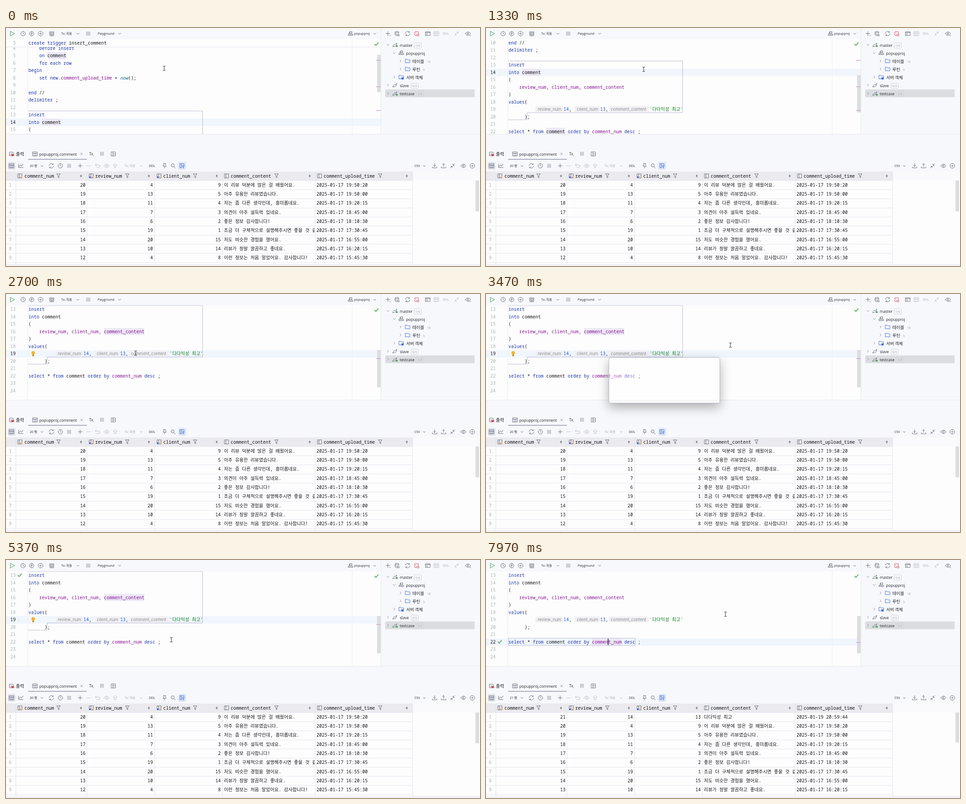
These frames come from a looping animation (1055x531 px, 8000 ms). An HTML page:

```html
<!DOCTYPE html>
<html lang="ko">
<head>
<meta charset="utf-8">
<title>SQL console</title>
<style>
html, body { margin: 0; width: 100%; height: 100%; overflow: hidden; background: #f7f8fb; }
#stage { position: relative; width: 1055px; height: 531px; overflow: hidden; }
svg { position: absolute; left: 0; top: 0; overflow: hidden; }
text { font: 8.6px "Open Sans", "Noto Sans CJK KR", "Noto Sans CJK", sans-serif; fill: #24262c; white-space: pre; }
.mono { font: 500 10px "Noto Sans Mono", "Noto Sans CJK KR", "Noto Sans CJK", monospace; fill: #17181c; }
.ko { font-family: "Noto Sans CJK KR", "Noto Sans CJK", sans-serif; font-size: 10.25px; font-weight: 400; }
.small { font-size: 7px; }
.tag { font: 9.3px Inter, sans-serif; fill: #8b8d94; }
.num { font-weight: 400; fill: #acafb8; text-anchor: end; }
.end { text-anchor: end; }
.dim { fill: #a6a8b0; }
.key { fill: #1a32a8; }
.col { fill: #871094; }
.fn { fill: #00627a; font-style: italic; }
.int { fill: #1750eb; }
.str { fill: #067d17; }
.icon { fill: none; stroke-linecap: round; stroke-linejoin: round; }
.popup {
  position: absolute; left: 273px; box-sizing: border-box;
  border: 1px solid #b3b3c0; border-radius: 5px;
  background: rgba(255, 255, 255, .35);
  box-shadow: 0 9px 24px rgba(0, 0, 0, .3);
}
.scroll { animation: scroll 8s ease-out infinite; }
.thumb { animation: thumb 8s ease-out infinite; }
#cursor { animation: move 8s ease-in-out infinite; }
@keyframes scroll {
  0%, 8.125% { transform: translateY(0); }
  10.625%, 11.875% { transform: translateY(-49.5px); }
  14.375%, 16.25% { transform: translateY(-99px); }
  16.625% { transform: translateY(-111px); }
  18.75%, 19.5% { transform: translateY(-148.5px); }
  21.25%, 100% { transform: translateY(-159.5px); }
}
@keyframes thumb {
  0%, 8.125% { transform: translateY(0); }
  10.625%, 11.875% { transform: translateY(20px); }
  14.375%, 16.25% { transform: translateY(40px); }
  16.625% { transform: translateY(45px); }
  18.75%, 19.5% { transform: translateY(60.5px); }
  21.25%, 100% { transform: translateY(65px); }
}
@keyframes move {
  0% { transform: translate(352px, 90px); }
  16.625%, 20% { transform: translate(351px, 92px); }
  24.125% { transform: translate(317px, 118px); }
  28.75%, 32.5% { transform: translate(273px, 133px); }
  40%, 62.5% { transform: translate(544px, 114px); }
  67.125% { transform: translate(368px, 178px); }
  72.5%, 76.9% { transform: translate(272px, 183px); }
  83.75%, 100% { transform: translate(533px, 121px); }
}
</style>
</head>
<body>
<div id="stage"></div>
<script>
const LOOP = 8000, PITCH = 16.5, ROW = 20.3;
// Moments in ms: clicks on lines 19 and 22, finished insert, rerun, new rows
const CLICK1 = 2400, DONE = 4600, CLICK2 = 6000, RERUN = 7500, LOADED = 7900;
const INK = '#6c707e', PALE = '#bfc1ca', BLUE = '#4a78d8', GREEN = '#3a9e4b', RED = '#db4b50';

// Animation that shows something only from a to b
const spans = new Map();
function span(a, b) {
  const name = `on${a}to${b}`;
  spans.set(name, `@keyframes ${name}{0%{opacity:0}${a * 100 / LOOP}%{opacity:1}${b * 100 / LOOP}%{opacity:0}100%{opacity:0}}`);
  return `animation:${name} ${LOOP}ms step-end infinite`;
}
const during = (a, b, body) => `<g style="${span(a, b)}">${body}</g>`;

const ko = s => s.replace(/[가-힣]+/g, m => `<tspan class="ko">${m}</tspan>`);
const text = (x, y, s, cls = '') => `<text x="${x}" y="${y}" class="${cls}">${s}</text>`;
const mono = (x, mid, s, cls = '') => text(x, mid + 3.5, ko(String(s)), 'mono ' + cls);
const rect = (x, y, w, h, fill, rx = 0) => `<rect x="${x}" y="${y}" width="${w}" height="${h}" fill="${fill}" rx="${rx}"/>`;
const path = (d, color, width = 1) => `<path d="${d}" class="icon" stroke="${color}" stroke-width="${width}"/>`;
const ring = r => `M${-r} 0a${r} ${r} 0 1 0 ${2 * r} 0a${r} ${r} 0 1 0 ${-2 * r} 0`;

const shapes = {
  run: 'M-4-5L5 0L-4 5Z',
  clock: ring(5) + 'M0-3V0L2 1.5',
  letter: ring(5) + 'M-1 3V-2.5H.5a1.5 1.5 0 0 1 0 3H-1',
  gear: 'M-2-5H2L5-2V2L2 5H-2L-5 2V-2Z' + ring(1.7),
  box: 'M-4.5-4H4.5V3H-4.5ZM-2.5-2H2.5V1H-2.5ZM-4 5H4',
  down: 'M-2.5-1L0 1.5L2.5-1',
  right: 'M-1-2.5L1.5 0L-1 2.5',
  schema: 'M-1.5-4.5H3V-1H-1.5ZM-5 1H-1.5V4H-5ZM1 1H5V4H1ZM-3 1V-3H-1.5',
  plus: 'M-4.5 0H4.5M0-4.5V4.5',
  minus: 'M-4.5 0H4.5',
  db: 'M-4-3.5a4 1.7 0 0 1 8 0a4 1.7 0 0 1-8 0V3a4 1.7 0 0 0 4 1.7M4-3.5V0M-4 0a4 1.7 0 0 0 5 1.5M2 2H5V5H2Z',
  refresh: 'M-5-.5A5 5 0 0 1 4-3M5 .5A5 5 0 0 1-4 3M4-5V-2.6H1.6M-4 5V2.6H-1.6',
  halt: 'M4-1V-4H-4V4H-1M1 1H5V5H1Z',
  console: 'M-5-4H5V4H-5ZM-5-2H5M-3 0L-1 1.2L-3 2.4',
  table: 'M-5-4.5H5V4.5H-5ZM-5-1.5H5M-1.7-1.5V4.5M1.7-1.5V4.5',
  arrows: 'M5-5L1-1M1-4V-1H4M-5 5L-1 1M-4 1H-1V4',
  eye: 'M-6 0Q0-8 6 0Q0 8-6 0Z' + ring(1.8),
  link: 'M-5 4Q-4-1 0-1L4-4L2 2Q-1 4-5 4Z',
  folder: 'M-5-4H-1L0-2.5H5V4H-5Z',
  close: 'M-2.2-2.2L2.2 2.2M2.2-2.2L-2.2 2.2',
  layout: 'M-4.5-4.5H4.5V4.5H-4.5ZM-1-4.5V4.5M-1 0H4.5',
  chart: 'M-5-4V4H5M-4 2L-1-2L1.5 1L5-4',
  undo: 'M-3-4.5L-5.2-2L-3 .5M-5-2H2a3 3 0 0 1 0 6H-2',
  up: 'M0-5L4-1H1.7V4H-1.7V-1H-4Z',
  pin: 'M-2.5-5H2.5M-2-5V-1L-3.5 1H3.5L2-1V-5M0 1V5',
  search: 'M-4.5-1a3.5 3.5 0 1 0 7 0a3.5 3.5 0 1 0-7 0M1.5 2L5 5',
  panel: 'M-5-4.5H4V-1M-5-4.5V4H-1M-2-4.5V4M0 0H5L3 2.5V5L2 4V2.5Z',
  save: 'M0-5V1.5M-2.5-1L0 1.5L2.5-1M-5 2V4.5H5V2',
  load: 'M0 1.5V-5M-2.5-2.5L0-5L2.5-2.5M-5 2V4.5H5V2',
  funnel: 'M-4-4.5H4L1-.5V4L-1 3V-.5Z',
  field: 'M-4.5-4.5H4.5V4.5H-4.5ZM-1.5-4.5V4.5',
  sort: 'M-1.4-.8L0-2.5L1.4-.8ZM-1.4 1.2L0 2.9L1.4 1.2Z',
  tick: 'M-4 0L-1.2 3L4-3.2',
};
const icon = (name, x, y, color = INK, width = 1) =>
  `<g transform="translate(${x} ${y})">${path(shapes[name], color, width)}</g>`;
const icons = (y, list) => list.map(([name, x, color]) => icon(name, x, y, color)).join('');
const tick = (x, y) => icon('tick', x, y, GREEN, 1.6);

function topBar() {
  return icons(12.5, [
    ['run', 14, GREEN], ['clock', 38], ['letter', 57], ['gear', 77], ['box', 102], ['down', 160],
    ['down', 253], ['schema', 767], ['down', 821], ['plus', 850], ['db', 870], ['refresh', 894],
    ['halt', 914, RED], ['console', 939], ['table', 958, PALE], ['arrows', 1003, PALE], ['eye', 1028],
  ]) + rect(178, 8, 10, 9, '#cfd0d5', 1)
    + text(123, 15, 'Tx: 자동', 'small') + text(204, 15, 'Playground', 'small')
    + text(775, 15, 'popupproj', 'small') + text(972, 15, 'DDL', 'small dim')
    + path('M854 17h2M1032 17h2', INK);
}

function tree() {
  const node = (y, x, arrow, name, label, color = INK) =>
    icon(arrow, x, y - 1, '#888b96') + icon(name, x + 16, y - 1, color)
    + text(x + 26.5, y + 3.3, label.replace(/[가-힣]+/g, m => `<tspan font-size="9.5">${m}</tspan>`));
  const count = (x, y, s) => text(x, y + 3.2, s, 'small dim');
  const badge = (x, y, s) => count(x, y, s)
    + `<rect x="${x - 2.5}" y="${y - 5.5}" width="16" height="12" rx="2" fill="none" stroke="#d3d4da"/>`;
  const dot = y => `<circle cx="870" cy="${y + 2}" r="2" fill="${GREEN}"/>`;
  return rect(844, 137, 199, 17.5, '#dcdde0', 2)
    + node(38.5, 850, 'down', 'link', 'master') + badge(911, 38.5, '1/4') + dot(38.5)
    + node(56.5, 864, 'down', 'schema', 'popupproj')
    + node(74.5, 878, 'right', 'folder', '테이블', BLUE) + count(937, 74.5, '18')
    + node(92.5, 878, 'right', 'folder', '루틴', BLUE) + count(928, 92.5, '9')
    + node(110.5, 864, 'right', 'folder', '서버 객체', BLUE) + rect(880, 110, 5, 5, BLUE, 1)
    + node(128.5, 850, 'right', 'link', 'slave') + badge(904, 128.5, '0/3')
    + node(147, 850, 'right', 'link', 'testcase') + badge(916, 147, '1/7') + dot(147);
}

const lineY = n => 210 + (n - 14) * PITCH;
const paint = s => s
  .replace(/\b(create|trigger|before|insert|on|for|each|row|begin|set|new|end|delimiter|into|values|select|from|order|by|desc)\b/g, '<tspan class="key">$1</tspan>')
  .replace(/\b(comment_upload_time|review_num|client_num|comment_num|comment_content)\b/g, '<tspan class="col">$1</tspan>')
  .replace('now', '<tspan class="fn">now</tspan>');
const codeLine = (s, mid) => s && text(50 + 6 * s.search(/\S/), mid + 3.5, paint(s.trim()), 'mono');

const FIRST = 3;
const code = [
  'create trigger insert_comment', '    before insert', '    on comment', '    for each row', 'begin',
  '    set new.comment_upload_time = now();', '', 'end //', 'delimiter ;', '', 'insert', 'into comment', '(',
  '    review_num, client_num, comment_content', ')', 'values(', '', '      );', '',
  'select * from comment order by comment_num desc ;', '', '',
];

function editor() {
  const current = (a, b, n) => during(a, b, rect(0, lineY(n) - 8, 834, 16.5, '#f1f6fd') + mono(21.5, lineY(n), n, 'end'));
  const mark = (x, n, chars) => rect(x, lineY(n) - 8, chars * 6, 16, '#ece8f5');
  const tag = (x, w, s) => rect(x, lineY(19) - 7, w, 13, '#f1f1f4', 2) + text(x + 5, lineY(19) + 3, s, 'tag');
  const stripes = (...ys) => ys.map(y => rect(824, y - .7, 10, 1.5, '#cba6e0')).join('');
  const y13 = lineY(13) - 8.5, y19 = lineY(19), y22 = lineY(22);

  const numbers = code.map((_, i) => mono(21.5, lineY(i + FIRST), i + FIRST, 'num')).join('');
  const lines = code.map((s, i) => codeLine(s, lineY(i + FIRST))).join('');
  const args = tag(110, 62, 'review_num') + tag(197, 57, 'client_num') + tag(273, 90, 'comment_content')
    + mono(172.5, y19, '<tspan class="int">14</tspan>,')
    + mono(254, y19, '<tspan class="int">13</tspan>,')
    + mono(364, y19, "'다다익성 최고'", 'str');
  const bulb = `<circle cx="60.5" cy="${y19 - 1.5}" r="4" fill="#f5b324"/>` + rect(58.5, y19 + 2.5, 4, 3, '#c08a2a', 1);
  const sticky = rect(0, 25, 834, 17, '#fdfdfd') + rect(0, 42, 834, 1, '#e6e6ee')
    + mono(21.5, 33.5, FIRST, 'num') + codeLine(code[0], 33.5);

  return `<g clip-path="url(#view)">` + rect(0, 25, 834, 212, '#fdfdfd')
    + `<g class="scroll">` + numbers
    + current(0, CLICK1, 14) + current(CLICK1, CLICK2, 19) + current(CLICK2, LOOP, 22)
    + during(0, CLICK1, mark(92, 5, 7) + mark(80, 14, 7) + mark(134, 22, 7))
    + during(CLICK1, CLICK2, mark(218, 16, 15) + bulb)
    + during(CLICK2, LOOP, mark(236, 22, 11) + `<rect x="50" y="${y22 - 8}" width="282" height="16" fill="none" stroke="#b9b4dc"/>`)
    + during(0, CLICK2, path(`M50 ${y13}H437.5V${y19 + 7.5}H91.5V${lineY(20) + 7}H50`, '#b9b7d0'))
    + lines + args
    + during(DONE, RERUN, tick(30.5, lineY(13))) + during(LOADED, LOOP, tick(30.5, y22))
    + during(CLICK2, LOOP, rect(271, y22 - 7, 1.5, 14, '#101114'))
    + `</g>` + during(0, 1100, sticky) + rect(48, 25, 1, 212, '#ebecf0') + rect(770, 25, 1, 212, '#f0f0f4')
    + `<g class="thumb">${rect(826, 60, 8, 83, '#dddde1')}</g>`
    + during(0, CLICK1, stripes(72, 131, 184)) + during(CLICK1, CLICK2, stripes(144)) + during(CLICK2, LOOP, stripes(184))
    + tick(824.5, 36) + `</g>` + rect(834, 0, 1, 237, '#e6e7ed') + rect(0, 236.5, 1055, 1, '#e4e5ec');
}

function resultBars() {
  return path('M8 277H16V285H8ZM10 283L12 280L14 282', INK) + rect(12, 281, 6, 5, RED, 2)
    + text(22, 284.5, '<tspan font-size="10" font-weight="500">출력</tspan>')
    + icon('table', 64.5, 281) + text(74, 284.7, '<tspan font-size="8.7">popupproj.comment</tspan>')
    + icon('close', 168, 281, '#9a9ca6') + rect(49, 292, 131, 2, '#a9adbd', 1)
    + text(185, 284, 'Tx') + path('M194 285h1', INK)
    + rect(209, 276, 9, 9, '#cfd0d5', 1) + icon('layout', 239, 281)
    + rect(4, 299, 17, 17, '#e2e3e8', 3) + rect(383.5, 299, 17, 17, '#dbe3f5', 3)
    + rect(136, 303, 9, 9, '#cfd0d5', 1)
    + icons(307.5, [
      ['table', 12.5], ['chart', 33], ['down', 80], ['refresh', 101], ['clock', 121], ['plus', 165],
      ['minus', 184, PALE], ['undo', 204, PALE], ['eye', 224, PALE], ['up', 243, PALE], ['down', 301, PALE],
      ['pin', 353], ['search', 372], ['panel', 392, BLUE], ['down', 931], ['save', 954], ['load', 974],
      ['arrows', 994], ['eye', 1018], ['gear', 1038],
    ])
    + during(0, LOADED, text(53, 310, '20 행', 'small')) + during(LOADED, LOOP, text(53, 310, '21 행', 'small'))
    + text(264, 310, 'Tx: 자동', 'small dim') + text(318, 310, 'DDL', 'small') + text(909, 310, 'CSV', 'small');
}

const rows = [
  [21, 14, 13, '다다익성 최고', '19 20:59:44'],
  [20, 4, 9, '이 리뷰 덕분에 많은 걸 배웠어요.', '17 19:50:20'],
  [19, 13, 5, '아주 유용한 리뷰였습니다.', '17 19:50:00'],
  [18, 11, 4, '저는 좀 다른 생각인데, 흥미롭네요.', '17 19:20:15'],
  [17, 7, 3, '의견이 아주 설득력 있네요.', '17 18:45:00'],
  [16, 6, 2, '좋은 정보 감사합니다!', '17 18:10:30'],
  [15, 19, 1, '조금 더 구체적으로 설명해주시면 좋을 것 같아요.', '17 17:30:45'],
  [14, 20, 15, '저도 비슷한 경험을 했어요.', '17 16:55:00'],
  [13, 10, 14, '리뷰가 정말 깔끔하고 좋네요.', '17 16:20:15'],
  [12, 4, 8, '이런 정보는 처음 알았어요. 감사합니다!', '17 15:45:30'],
];

function grid() {
  const edges = [22, 180, 331, 482, 688, 905];
  // Name, then the places of icon, label, filter and sort arrows
  const heads = [
    ['comment_num', 31, 41, 117, 167], ['review_num', 190, 198.5, 270, 318], ['client_num', 341, 350, 421, 469],
    ['comment_content', 491, 500, 602, 676], ['comment_upload_time', 698, 707, 833, 892],
  ];
  const rowY = i => 350.3 + i * ROW;
  const page = first => rows.slice(first, first + 9).map(([id, review, client, note, date], i) => {
    const y = rowY(i);
    return mono(177, y, id, 'end') + mono(327, y, review, 'end') + mono(478, y, client, 'end')
      + `<g clip-path="url(#note)">${mono(485, y, note)}</g>` + mono(691, y, '2025-01-' + date);
  }).join('');

  let out = rect(0, 320, 1055, 207, '#fdfdfd') + rect(0, 320, 905, 20, '#ebebef') + rect(905, 320, 150, 20, '#fafafc');
  for (let i = 0; i <= 9; i++) {
    out += rect(0, 340 + i * ROW, 905, 1, '#e7e7f0');
    if (i < 9) out += mono(12.5, rowY(i), i + 1, 'num');
  }
  out += edges.map(x => rect(x - .5, 320, 1, 207, '#e2e3ec')).join('');
  heads.forEach(([name, x, label, funnel, sort], i) => {
    out += icon('field', x, 330) + mono(label, 330, name)
      + icon('funnel', funnel, 330) + icon('sort', sort, 330, '#777a85');
    if (i < 3) out += `<circle cx="${x + 3}" cy="332" r="2" fill="#fdf3e6" stroke="#e08a3c"/>`;
    if (i == 1 || i == 2) out += rect(x - 5, 331, 4, 4, BLUE, 1);
  });
  out += during(0, LOADED, page(1) + rect(1045, 340, 8, 69, '#dcdce0'))
    + during(LOADED, LOOP, page(0) + rect(1045, 340, 8, 67, '#dcdce0'));

  let spokes = '';
  for (let i = 0; i < 8; i++) {
    spokes += `<path d="M0-4.5V-9" stroke="#a0a2aa" stroke-width="2" opacity="${.15 + i * .04}" transform="rotate(${i * 45})"/>`;
  }
  return out + during(7650, LOOP, `<g transform="translate(525 410.5)">${spokes}</g>`)
    + rect(0, 527, 1055, 4, '#f5f5f8') + rect(0, 527, 1055, 1, '#e6e6ee');
}

const popup = (top, w, h, a, b) => `<div class="popup" style="top:${top}px;width:${w}px;height:${h}px;${span(a, b)}"></div>`;

document.getElementById('stage').innerHTML =
  `<svg width="1055" height="531"><defs>
    <clipPath id="view"><rect y="25" width="834" height="211.5"/></clipPath>
    <clipPath id="note"><rect x="482" y="340" width="205" height="187"/></clipPath></defs>`
  + rect(0, 0, 1055, 531, '#f7f8fb') + editor() + topBar() + tree() + resultBars() + grid() + '</svg>'
  + popup(141, 248, 103, 3430, 4250) + popup(191, 238, 85, 6760, 7400)
  + `<svg width="1055" height="531"><g id="cursor">`
  + path('M-2.5-5H-1L0-4L1-5H2.5M0-4V4M-2.5 5H-1L0 4L1 5H2.5', '#2a2a2e') + '</g></svg>';

const style = document.createElement('style');
style.textContent = [...spans.values()].join('\n');
document.head.append(style);
</script>
</body>
</html>
```
